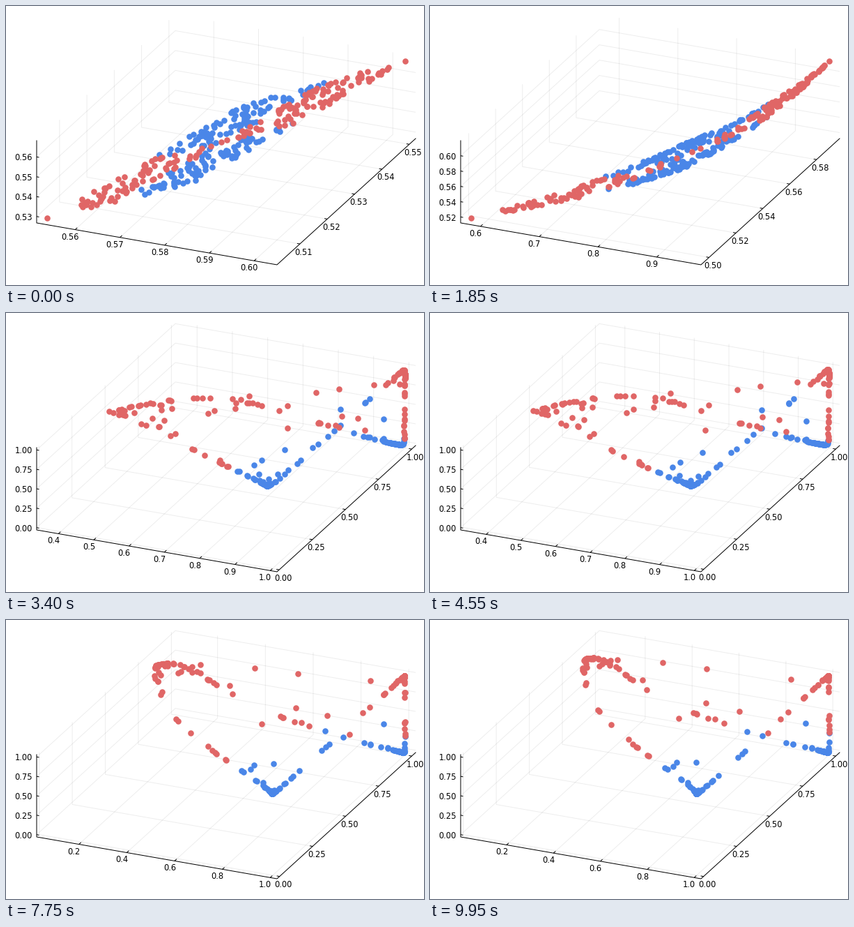
These frames come from a looping animation (600x400 px, 10 s). A matplotlib script:

```python
import numpy as np
import matplotlib.pyplot as plt
from matplotlib.animation import FuncAnimation
from matplotlib.collections import LineCollection

W, H, DPI = 600, 400, 100
FRAMES, INTERVAL = 200, 50
PX = 72 / DPI
BLUE, RED = "#4a86e8", "#e06666"
PAD = 0.03

# Screen projection of the unit cube
ORIGIN = np.array([44.0, 311.0])
BASIS = np.array([[345.0, 60.0], [199.0, -181.0], [0.0, -118.0]])


def pose(steepness, bias, mean, tilt):
    """Network state: each plotted unit weighs the two inner units mean +- tilt."""
    mean, tilt = np.array(mean), np.array([0, *tilt])
    return np.array([np.full(3, steepness), bias, mean + tilt, mean - tilt])


START = pose(0.6, (0.21, 0.01, 0.11), (0.104, 0.096, 0.079), (0.04, 0.03))
EARLY = pose(1, (0.33, -0.03, 0.07), (0.2, 0.061, 0.075), (0.037, 0.053))
RIDGE = pose(6, (0, 0, 0), (5, 0.57, 0.57), (-0.09, 0.09))
OPEN = pose(9, (-0.67, -0.13, 1.14), (4.5, 4.2, 0.65), (-8.8, 9.35))
FINAL = pose(13, (-3.7, 2.15, 2.2), (8.75, 1.5, 1.5), (-8.2, 10.7))

# XOR data: random points, coloured by quadrant, two opposite corners included
rng = np.random.default_rng(4)
points = np.vstack([rng.uniform(-1, 1, (358, 2)), [[-1, -1], [1, 1]]])
same_sign = points[:, 0] * points[:, 1] > 0


def sigmoid(v):
    return 1 / (1 + np.exp(-v))


def settle(sec, begin, tau):
    return 1 - np.exp(-max(sec - begin, 0) / tau)


def state_at(sec):
    """Slow drift, accelerating stretch, quick opening, long settling."""
    if sec < 2.5:
        drift = START + (EARLY - START) * min(sec / 1.15, 1)
        stretch = max(sec - 1.15, 0) / 1.35
        return drift + (RIDGE - drift) * stretch ** 2
    opened = RIDGE + (OPEN - RIDGE) * settle(sec, 2.5, 0.35)
    return opened + (FINAL - opened) * settle(sec, 4.55, 2.3)


def activations(sec):
    steepness, bias, *weights = state_at(sec)
    k = steepness[0]
    # Each inner unit is sharper where the other input is positive
    local = k * (1 + k / 24 * np.tanh(3 * points[:, ::-1]))
    low, high = sigmoid(-k), sigmoid(k)
    inner = (sigmoid(local * points) - low) / (high - low)
    return sigmoid(bias + inner @ np.array(weights))


def project(cube):
    return ORIGIN + np.asarray(cube, float) @ BASIS


def pick_ticks(lo, hi):
    """Tick values and decimals, aiming for about five round steps."""
    power = int(np.floor(np.log10(hi - lo)))
    best = None
    for e in (power - 1, power):
        for q, cost, extra in ((1, 0, 0), (5, 0.5, 0), (2, 1.2, 0), (2.5, 1.2, 1)):
            step = q * 10.0 ** e
            first, last = np.ceil(lo / step), np.floor(hi / step)
            score = abs(last - first + 1 - 5) + cost
            if best is None or score < best[0]:
                best = (score, np.arange(first, last + 1) * step, max(0, extra - e))
    return best[1:]


def grid_path(axis, p):
    """Grid line of one tick across the floor and up or along a wall."""
    if axis == 0:
        return project([(p, 0, 0), (p, 1, 0), (p, 1, 1)])
    if axis == 1:
        return project([(1, p, 0), (0, p, 0), (0, p, 1)])
    return project([(0, 0, p), (0, 1, p), (1, 1, p)])


fig = plt.figure(figsize=(W / DPI, H / DPI), dpi=DPI, facecolor="white")
ax = fig.add_axes([0, 0, 1, 1])
ax.set_xlim(0, W)
ax.set_ylim(H, 0)
ax.axis("off")

grid = LineCollection([], colors=(0, 0, 0, 0.07), linewidths=PX, zorder=1)
ticks = LineCollection([], colors="black", linewidths=PX, zorder=2)
ax.add_collection(grid)
ax.add_collection(ticks)
edges = project([(0, 0, 1), (0, 0, 0), (1, 0, 0), (1, 1, 0)])
ax.plot(*edges.T, color="black", lw=PX, zorder=2)

dots = [ax.scatter([], [], s=(8.6 * PX) ** 2, c=color, linewidths=0, zorder=z)
        for color, z in ((BLUE, 3), (RED, 4))]

# Per axis: tick edge, inward tick vector, label offset, label alignment
AXES = [
    ((0, 0, 0), (3, -2.7), (-7, 9), "center"),
    ((1, 0, 0), (-4, -0.7), (5.5, 10.5), "center"),
    ((0, 0, 0), (3.5, 0.6), (-6, 0), "right"),
]
labels = [[ax.text(0, 0, "", family="DejaVu Sans", size=8.3, color="black",
                   ha=spec[3], va="center_baseline", zorder=5)
           for _ in range(14)] for spec in AXES]


def draw(n):
    values = activations(n * INTERVAL / 1000)
    lo, hi = values.min(axis=0), values.max(axis=0)
    lo, hi = lo - PAD * (hi - lo), hi + PAD * (hi - lo)
    screen = project((values - lo) / (hi - lo))
    dots[0].set_offsets(screen[~same_sign])
    dots[1].set_offsets(screen[same_sign])

    lines, marks = [], []
    for axis, (start, inward, offset, _) in enumerate(AXES):
        for text in labels[axis]:
            text.set_text("")
        found, decimals = pick_ticks(lo[axis], hi[axis])
        for text, value in zip(labels[axis], found):
            p = (value - lo[axis]) / (hi[axis] - lo[axis])
            cube = list(start)
            cube[axis] = p
            at = project(cube)
            lines.append(grid_path(axis, p))
            marks.append([at, at + inward])
            text.set_position(at + offset)
            text.set_text(f"{abs(value):.{decimals}f}")
    grid.set_segments(lines)
    ticks.set_segments(marks)
    return [grid, ticks, *dots]


anim = FuncAnimation(fig, draw, frames=FRAMES, interval=INTERVAL,
                     repeat=True, repeat_delay=0, blit=False)
plt.show()
```
